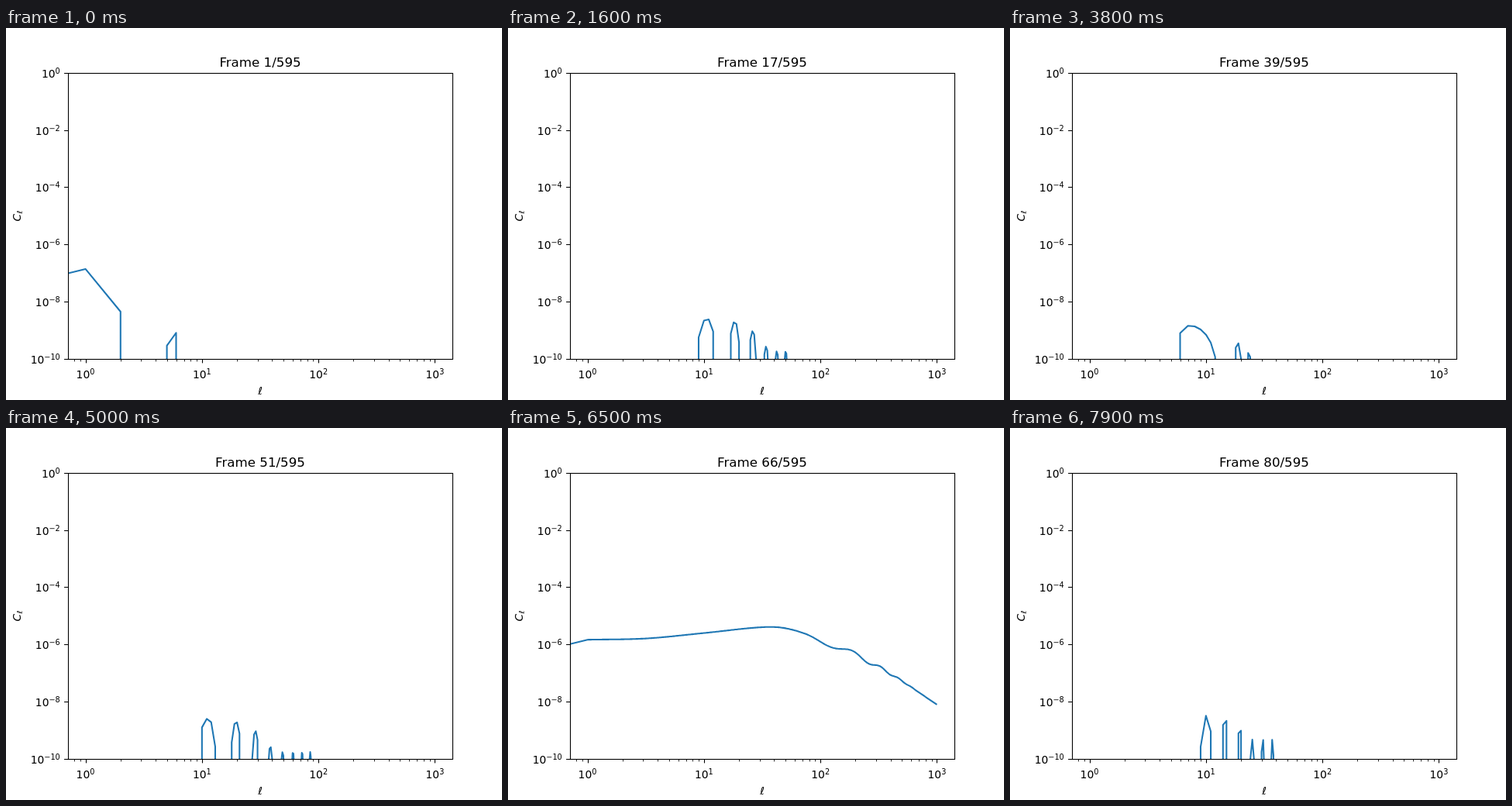
An HTML page for the animation above (8 s loop, 640 px wide and 480 px high).

```html
<!DOCTYPE html>
<html lang="en">
<head>
<meta charset="utf-8">
<title>Angular power spectra</title>
<style>
  html, body { margin: 0; width: 100%; height: 100%; overflow: hidden; background: #fff; }
  svg { display: block; width: 640px; height: 480px; }
  text { font-family: "DejaVu Sans", sans-serif; font-size: 13.89px; fill: #000; }
</style>
</head>
<body>
<svg id="plot" viewBox="0 0 640 480">
  <clipPath id="axes"><rect x="80" y="57.6" width="496" height="369.6"/></clipPath>
  <path id="curve" clip-path="url(#axes)" fill="none" stroke="#1f77b4" stroke-width="2.08" stroke-linejoin="round"/>
  <rect x="80.5" y="58.5" width="496" height="369" fill="none" stroke="#000" stroke-width="1.1"/>
  <g id="scale" stroke="#000"></g>
  <g id="labels"></g>
  <text id="title" x="328" y="50" text-anchor="middle" style="font-size:16.67px"></text>
  <text x="328" y="472.5" text-anchor="middle" font-style="italic">ℓ</text>
  <text transform="translate(19 249.5) rotate(-90)" font-style="italic">C<tspan dy="2.2" style="font-size:9.72px">ℓ</tspan></text>
</svg>
<script>
const STEP = 100, STEPS = 80, TOTAL = 595, BINS = 34;
const DECADE_X = 496 / 3.3, DECADE_Y = 36.96, BELOW = 560;
const el = id => document.getElementById(id);
const logX = decade => 80 + (decade + 0.15) * DECADE_X;
const px = l => logX(Math.log10(l));
const py = exponent => 57.6 - exponent * DECADE_Y;
const snap = v => Math.floor(v + 0.5) + 0.5;
const join = points => "M" + points.map(p => p.map(v => v.toFixed(2)).join(" ")).join("L");

// Lobe pattern at a few bin separations; everything between is interpolated.
const patterns = [
  { gap: 33, first: 5.9, spacing: 5, stretch: 0, count: 1, width: 1.7, growth: 0, skew: 0.6, top: 393, drop: 10, dim: 420 },
  { gap: 28, first: 7.3, spacing: 14.4, stretch: -3.2, count: 3, width: 1.6, growth: -0.6, skew: 3.5, top: 384, drop: 20, dim: 412 },
  { gap: 19, first: 10.1, spacing: 4.3, stretch: 0.22, count: 6, width: 1.25, growth: 0, skew: 1, top: 371, drop: 4, dim: 402 },
  { gap: 17, first: 10.6, spacing: 7.7, stretch: 0.05, count: 6, width: 2.1, growth: 0, skew: 1, top: 375, drop: 4, dim: 417 },
  { gap: 16, first: 11.2, spacing: 8.1, stretch: 0.35, count: 8, width: 2.1, growth: 0, skew: 1, top: 375, drop: 4, dim: 418 },
  { gap: 3, first: 94.7, spacing: 50.3, stretch: 0, count: 2, width: 5.2, growth: 3.2, skew: 1.95, top: 391, drop: -8, dim: 418 }
];

function patternAt(gap) {
  let i = 1;
  while (i < patterns.length - 1 && gap < patterns[i].gap) i++;
  const a = patterns[i - 1], b = patterns[i];
  const t = (1 / gap - 1 / a.gap) / (1 / b.gap - 1 / a.gap);
  return Object.fromEntries(Object.keys(a).map(key => [key, a[key] + (b[key] - a[key]) * t]));
}

// A positive lobe, sampled at whole multipoles and dropping off the log axis at both ends.
function lobePath(peak, left, right, top) {
  const start = peak - left, span = left + right;
  const power = Math.log(0.5) / Math.log(left / span);
  const points = [];
  for (let l = Math.ceil(start); l < peak + right; l++) {
    const v = Math.sin(Math.PI * ((l - start) / span) ** power) ** 1.5;
    points.push([px(l), top - DECADE_Y * Math.log10(Math.max(v, 1e-4))]);
  }
  if (!points.length) return "";
  return join([[points[0][0], BELOW], ...points, [points[points.length - 1][0], BELOW]]);
}

function lobes(gap) {
  const p = patternAt(gap);
  let d = "";
  for (let n = 0; n < Math.max(1, Math.floor(p.count + 0.01)); n++) {
    const peak = p.first + p.spacing * n + p.stretch * n * n;
    const width = Math.max(0.4, p.width * (1 + p.growth * n));
    d += lobePath(peak, width, width * p.skew, Math.min(p.dim, p.top + p.drop * n * n));
  }
  return d;
}

function lowEnd(gap) {
  const fade = (33 - gap) * 0.2, x = px(2);
  const y1 = py(-6.855 - fade), y2 = py(-8.345 - fade);
  return join([[80, y1 + 5.6], [px(1), y1], [x, y2], [x, BELOW]]);
}

// Smooth curve through key points, with slopes taken from their neighbours.
function hermite(keys, x) {
  let i = 0;
  while (i < keys.length - 2 && x > keys[i + 1][0]) i++;
  const slope = j => {
    const a = keys[Math.max(0, j - 1)], b = keys[Math.min(keys.length - 1, j + 1)];
    return (b[1] - a[1]) / (b[0] - a[0]);
  };
  const [x0, y0] = keys[i], [x1, y1] = keys[i + 1], h = x1 - x0, t = (x - x0) / h, s = 1 - t;
  return y0 * (1 + 2 * t) * s * s + y1 * t * t * (3 - 2 * t) + h * t * s * (slope(i) * s - slope(i + 1) * t);
}

const broadband = [[0, -5.833], [0.5, -5.79], [1, -5.6], [1.5, -5.395], [1.7, -5.435],
  [1.93, -5.736], [2.3, -6.36], [2.64, -7.12], [3, -8.1]];

function neighbourPower(x) {
  const l = 10 ** x;
  const strength = 0.12 * Math.exp(-((l / 370) ** 2)) / (1 + (80 / l) ** 8);
  return hermite(broadband, x) + strength * Math.sin(2 * Math.PI * (l - 155) / 140);
}

const autoPower = x => -5.25 + 0.55 * Math.exp(-(((x - 1.75) / 0.75) ** 2)) -
  0.7 / (1 + Math.exp((2.6 - x) / 0.2));

function smoothPath(power) {
  const points = [[80, py(power(0)) + 5.6]];
  for (let i = 0; i <= 300; i++) points.push([logX(i / 100), py(power(i / 100))]);
  return join(points);
}

// Each row of bin pairs runs from the widest separation down to zero.
function binGap(step) {
  let length = BINS;
  while (step >= length) step -= length--;
  return length - 1 - step;
}

function spectrum(gap) {
  if (gap === 0) return smoothPath(autoPower);
  if (gap === 1) return smoothPath(neighbourPower);
  return (gap >= 30 ? lowEnd(gap) : "") + lobes(gap);
}

function drawAxes() {
  const tick = (d, width) => `<path d="${d}" stroke-width="${width}"/>`;
  const power = (x, y, n, anchor) => `<text x="${x}" y="${y}" text-anchor="${anchor}">10` +
    `<tspan dy="-5.3" style="font-size:9.72px">${String(n).replace("-", "−")}</tspan></text>`;
  let ticks = "", labels = "";
  for (let n = 0; n >= -10; n -= 2) {
    ticks += tick(`M80 ${snap(py(n))}h-4.9`, 1.1);
    labels += power(69.8, snap(py(n)) + 5.5, n, "end");
  }
  for (let n = -1; n <= 3; n++) {
    if (n >= 0) {
      ticks += tick(`M${snap(logX(n))} 428v4.4`, 1.1);
      labels += power(logX(n), 452, n, "middle");
    }
    for (let k = 2; k < 10; k++) {
      const x = px(k * 10 ** n);
      if (x > 80 && x < 576) ticks += tick(`M${snap(x)} 428v2.4`, 0.83);
    }
  }
  el("scale").innerHTML = ticks;
  el("labels").innerHTML = labels;
}

let shown = -1;
function render(time) {
  const step = Math.floor(time / STEP) % STEPS;
  if (step === shown) return;
  shown = step;
  el("title").textContent = `Frame ${step + 1}/${TOTAL}`;
  el("curve").setAttribute("d", spectrum(binGap(step)));
}

drawAxes();
render(0);
const begin = performance.now();
function animate() {
  render(performance.now() - begin);
  requestAnimationFrame(animate);
}
requestAnimationFrame(animate);
</script>
</body>
</html>
```
